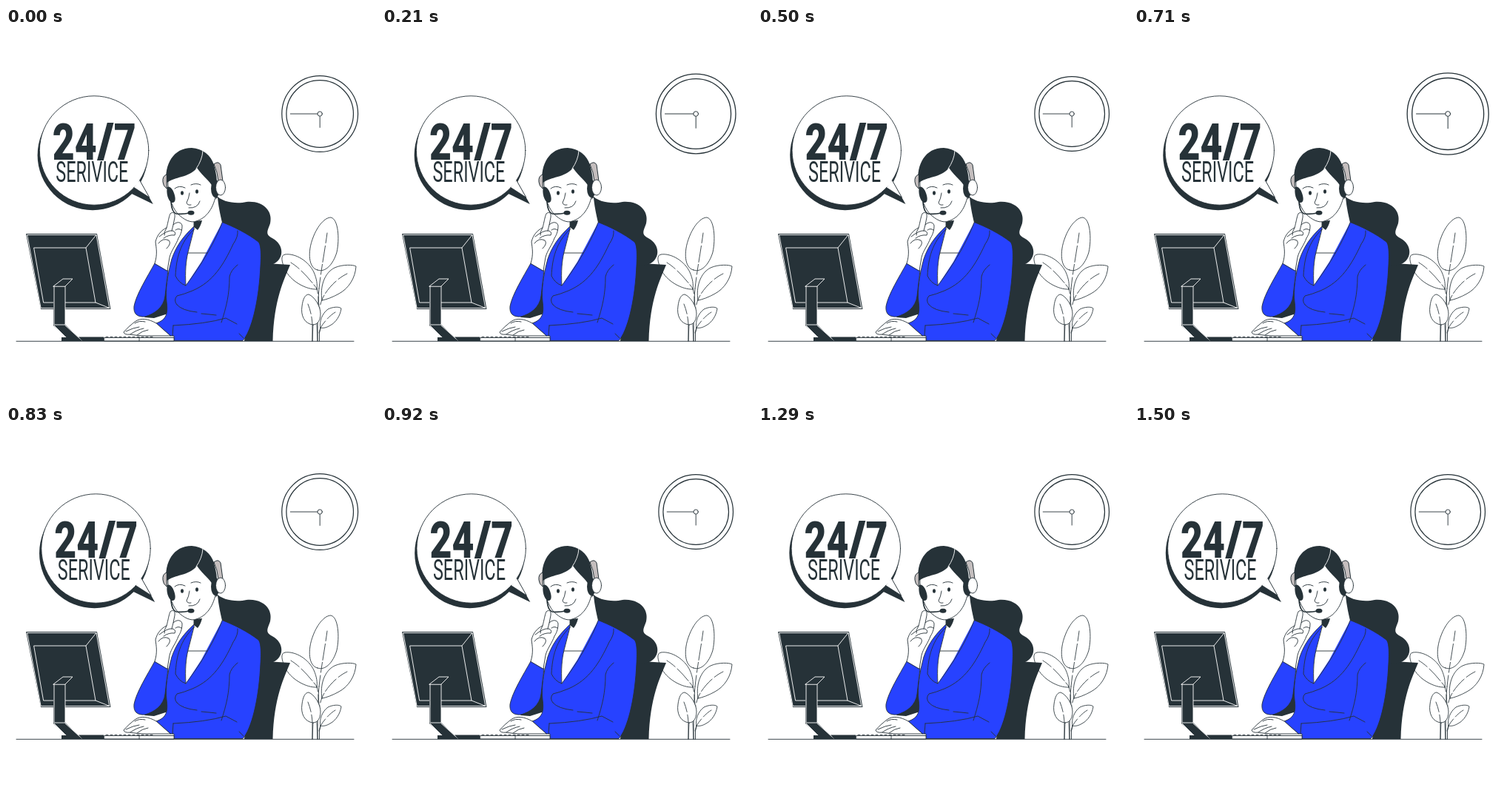
Recreate the animation shown at these times as an HTML page. Size 500x500 px, loop 1.54 s.

```html
<!DOCTYPE html>
<html lang="en">
<head>
<meta charset="utf-8">
<title>24/7 service</title>
<style>
  html, body { margin: 0; width: 100%; height: 100%; overflow: hidden; background: #fff; }
  svg { display: block; width: 100%; height: 100%; }
  path, circle, ellipse { stroke-linecap: round; stroke-linejoin: round; }
  .ink { fill: #263238; }
  .line { fill: none; stroke: #263238; stroke-width: .9; }
  .skin { fill: #fff; stroke: #263238; stroke-width: .9; }
  .shirt { fill: #fff; }
  .leaf { fill: #fff; stroke: #263238; stroke-width: .85; }
  .vein { fill: none; stroke: #263238; stroke-width: .85; stroke-dasharray: 14 4 22 3; }
  .blue { fill: #2742ff; stroke: #263238; stroke-width: .9; }
  .edge { fill: none; stroke: #fff; stroke-width: .9; }
  .grey { fill: #c4bebe; stroke: #263238; stroke-width: 1; }
  .mic { fill: none; stroke: #263238; stroke-width: 1.7; }
  .rim { fill: #fff; stroke: #263238; stroke-width: 1.2; }
  text { font-family: Roboto, "Liberation Sans", sans-serif; fill: #263238; text-anchor: middle; }
  .big { font-size: 69px; font-weight: 900; }
  .slash { font-family: "Open Sans", sans-serif; font-weight: 800; }
  .small { font-size: 38.5px; font-weight: 400; }
</style>
</head>
<body>
<svg viewBox="0 0 500 500">
  <g id="plant">
    <path class="leaf" d="M414 423L415 398Q418 392 420 400L421 423"/>
    <path class="line" d="M414 423V392M421 423C421 395 422 360 423 352M423.500 423V412Q424 404 430 396"/>
    <path class="leaf" d="M421 327C409 325 407 303 415 283C421 267 431 256 439 256C449 258 451 285 447 303C442 320 431 331 421 327Z"/>
    <path class="vein" d="M434 277C431 300 426 325 423 352"/>
    <path class="leaf" d="M420 353C406 354 384 342 377 326C372 315 371 307 377 306C391 304 409 315 416 330C420 339 421 347 420 353Z"/>
    <path class="vein" d="M385 317C398 325 410 339 420 352Q423 362 423 385"/>
    <path class="leaf" d="M427 368C424 350 430 331 444 324C455 319 470 320 473 322C472 338 463 352 450 359C441 364 433 367 427 368Z"/>
    <path class="vein" d="M461 332C446 339 432 355 427 367Q423 378 422 392"/>
    <path class="leaf" d="M415 401C403 400 398 388 400 376C401 367 404 360 409 360C417 363 425 376 425 386C425 395 421 401 415 401Z"/>
    <path class="vein" d="M408 373Q413 385 414 400"/>
    <path class="leaf" d="M425 405C423 397 427 386 435 380C441 377 450 376 453 379C452 388 446 398 438 402C433 405 429 406 425 405Z"/>
    <path class="vein" d="M445 384C438 388 430 397 425 405L423 412"/>
  </g>

  <g id="chair">
    <path class="ink" d="M335 317L384 320C376 340 362 366 360.500 423H322Z"/>
    <path class="ink" d="M283 225C292 236 312 238 325 235C347 233 361 247 357 264C354 273 350 278 358 283C373 290 376 305 368 314C363 320 354 322 340 322L300 272L286 262Z"/>
  </g>

  <g id="woman">
    <path class="ink" d="M219 342L222 385L200 392L187 391Z"/>
    <path class="blue" d="M201 318C191 336 176 360 173 376C172 386 177 391 188 390C201 386 213 378 215 362L219 328Z"/>
    <path class="blue" d="M254 268C238 283 230 295 224 312C218 334 215 355 217 370C219 386 217 394 203 399L222 416H227V422.500H320C332 409 341 370 343.500 330C345 308 345 293 341 289C327 278 307 268 291 262Z"/>
    <path class="shirt" d="M253 258L254 271L246 303C242 320 242 336 243 348L264 316L292 263C289 250 287 240 286 229Z"/>
    <path class="line" d="M246 304H272M254 261V272"/>
    <path class="ink" d="M254 261L265 260Q263 268 259 273L254 269Z"/>
    <g class="line">
      <path d="M254 272C235 290 230 312 229 335Q234 345 243 348C242 329 243 315 246 303L254 272"/>
      <path d="M243 348C258 328 280 296 292 263"/>
      <path d="M313 274Q314 282 307 292C294 320 280 343 252 355Q240 360 231 362Q226 368 231 374"/>
      <path d="M231 374Q238 382 258 384M264 386Q276 387 284 388"/>
      <path d="M313 320Q304 327 302 336C302 360 298 376 291 398"/>
      <path d="M226 402Q270 400 297 392L312 400M226 402L225 416M315 413L321 419"/>
    </g>

    <path class="skin" d="M219 205C218 222 223 241 232 251C240 259 250 264 257 261C271 257 281 243 284 223L280 190L240 185Z"/>
    <path class="ink" d="M216.500 210C214 184 226 162 251 162C266 163 277 172 281 185C285 200 287 213 282 220C278 208 266 201 258 189C247 203 228 200 216.500 210Z"/>
    <path class="edge" d="M266 166Q265 179 257 190"/>
    <path class="grey" d="M281 184Q287 179 290 185L293 207L287 207Q286 195 281 184Z"/>
    <ellipse class="ink" cx="283" cy="217" rx="6" ry="12"/>
    <ellipse class="skin" cx="290" cy="215.500" rx="6.500" ry="10.500"/>
    <path class="grey" d="M217 198Q211 200 212 208Q212 213 217 217Z"/>
    <path class="ink" d="M218 215C216 222 219 234 224 236C229 237 230 231 227 223C225 217 221 213 218 215Z"/>
    <path class="mic" d="M223 235Q224 249 230 251Q238 252 248 250"/>
    <ellipse class="ink" cx="250" cy="249.800" rx="4.500" ry="3"/>
    <ellipse class="ink" cx="238" cy="223" rx="2" ry="2.800"/>
    <ellipse class="ink" cx="258" cy="221" rx="2" ry="2.800"/>
    <path class="line" d="M228 217Q234 212 242 216M250 212Q257 209 263 212M248 223Q247 231 244 236Q245 240 250 239M247 243Q259 244 262 234"/>

    <path class="skin" d="M201 318C205 306 203 297 202 289C204 280 210 273 217 270C219 263 220 255 222 251C225 248 229 249 228 256L226 266C231 261 237 262 238 267C238 272 237 278 233 284C230 293 223 301 221 310L218 328Z"/>
    <path class="line" d="M226 266L224 274M217 270Q213 276 214 280M207 282Q218 273 225 274Q230 275 228 280Q220 279 213 284M229 273Q233 270 237 273M206 291Q212 283 220 287Q224 291 217 298"/>
    <path class="skin" d="M222 416H188C181 416 174 415 168 414Q160 415 159 411C163 406 169 401 174 397C182 391 193 393 203 399Z"/>
    <path class="line" d="M162 410Q172 405 180 404M168 414Q176 408 186 406M177 415Q184 409 192 408M174 399Q180 395 188 397"/>
  </g>

  <g id="desk">
    <path class="ink" d="M27 278H123L141.500 380H47Z"/>
    <path class="edge" d="M38 297H108L121 371H51ZM108 297L122 279.500M121 371L140 378.500M29 279.500H122L139.700 378.500H47.500Z"/>
    <path class="ink" d="M64 349L77 339H90L80 349V401L103 423H87L64 402Z"/>
    <path class="edge" d="M64 349L77 339H90L80 349ZM80 349V401H65V349M65 402L85 422M80 402L100 420"/>
    <path class="ink" d="M75 418H86L90 423H75ZM98 417.500H132V423H103Z"/>
    <path class="skin" d="M133 418.500H227V423H133Z"/>
    <path class="line" d="M180 418V423"/>
    <path class="line" stroke-dasharray="3 3" d="M135 417.300H200"/>
    <path class="line" d="M14 423.300H470"/>
  </g>

  <g id="bubble">
    <circle class="ink" cx="117.300" cy="171.700" r="74.500"/>
    <path class="ink" d="M160 221L168 223L199 238L181 206Z"/>
    <circle class="skin" cx="119.300" cy="165.500" r="73.700"/>
    <path class="skin" d="M181 206L194 229L173 215.500"/>
    <path class="shirt" d="M180.500 206L178 211L173 215L170 212L176 204Z"/>
    <g transform="translate(119.500 178) scale(.75 1)"><text class="big">24<tspan class="slash">/</tspan>7</text></g>
    <g transform="translate(116.600 208.300) scale(.61 1)"><text class="small">SERIVICE</text></g>
  </g>

  <g id="clock">
    <circle class="rim" r="50.300"/>
    <circle class="rim" r="44.300"/>
    <path class="line" d="M-39 0H-3M0 3V18"/>
    <circle class="skin" r="3.100"/>
  </g>
</svg>
<script>
  const LOOP = 1540, STEPS = 37, CYCLE = 1500;
  const bubble = document.getElementById("bubble");
  const clock = document.getElementById("clock");

  // keyframes as [position, value] pairs
  const beat = [[0, 1], [.1, 1.1], [.3, 1], [.4, 1], [.5, 1.1], [.6, 1], [1, 1]];
  const shake = [0, -1, 2, -4, 4, -4, 4, -4, 2, -1, 0].map((x, i) => [i / 10, x]);

  function sample(keys, p) {
    const i = Math.max(1, keys.findIndex(k => k[0] >= p));
    const [a, from] = keys[i - 1], [b, to] = keys[i];
    return from + (to - from) * (p - a) / (b - a);
  }

  function draw(ms) {
    // the motion advances 24 times a second
    const step = Math.min(STEPS - 1, Math.floor((ms % LOOP + 4) / LOOP * STEPS));
    const p = Math.min(1, (step * 1000 / 24 + 33) / CYCLE);
    bubble.setAttribute("transform", `translate(${sample(shake, p)} 0)`);
    clock.setAttribute("transform", `translate(424.200 116) scale(${sample(beat, p)})`);
  }

  const start = performance.now();
  function tick() {
    draw(performance.now() - start);
    requestAnimationFrame(tick);
  }
  tick();
</script>
</body>
</html>
```
